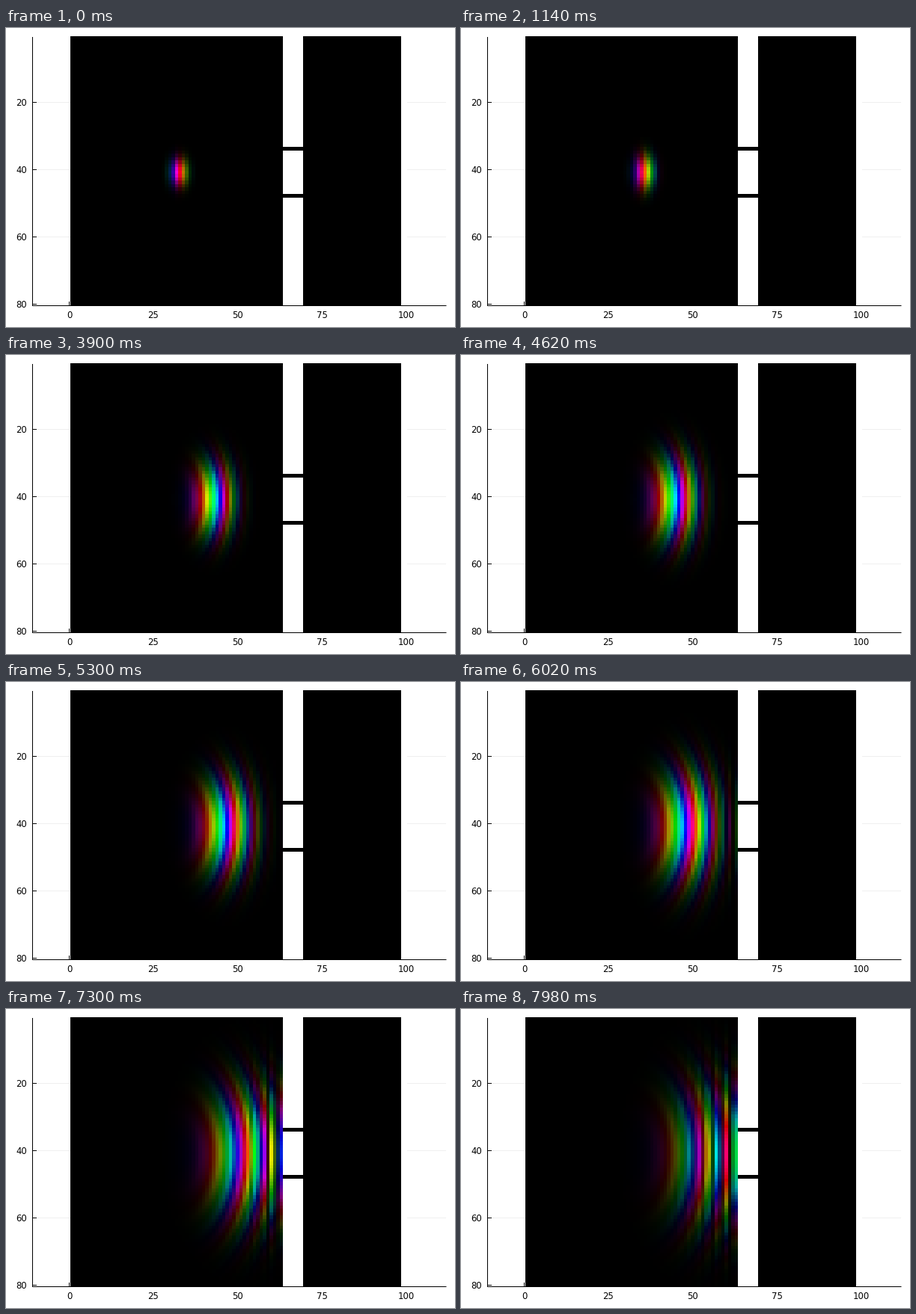
Recreate the animation shown at these times as a matplotlib script. Size 600 by 400 pixels, loop 8 s.

```python
import numpy as np
import matplotlib.pyplot as plt
from matplotlib.animation import FuncAnimation
from matplotlib.colors import hsv_to_rgb

W, H, DPI = 600, 400, 100
TICK_MS, LOOP_MS = 20, 8000
COLS, ROWS = 98, 80
CELL_W, CELL_H = 4.5, 4.49
LEFT, TOP = 86.2, 11.85

# Gaussian wave packet, in grid cells and time steps
X0, Y0 = 32.67, 41.0
SX, SY = 1.687, 2.72
K, V = 0.80, 0.125
SPREAD = 0.0274
PHASE = np.radians(336)
WALL = (64, 69)
SLITS = (34, 48)

gx = np.arange(1, COLS + 1)
gy = np.arange(1, ROWS + 1)[:, None]

wall = np.zeros((ROWS, COLS), bool)
wall[:, WALL[0] - 1:WALL[1]] = True
for row in SLITS:
    wall[row - 1] = False


def packet_x(x, n):
    s = 1 + 1j * SPREAD * n
    moved = x - X0 - V * n
    carrier = K * (x - X0) - K * V * n / 2
    return np.exp(-moved**2 / (4 * SX**2 * s) + 1j * carrier) / np.sqrt(s)


def packet_y(y, n):
    s = 1 + 1j * SPREAD * n
    return np.exp(-(y - Y0)**2 / (4 * SY**2 * s)) / np.sqrt(s)


def field(n):
    # the mirrored packet makes the wall reflect
    px = packet_x(gx, n) - packet_x(2 * WALL[0] - gx, n)
    px = np.where(gx < WALL[0], px, 0)
    return np.exp(1j * PHASE) * px * packet_y(gy, n)


def picture(n):
    psi = field(n)
    density = np.abs(psi)**2
    hue = np.angle(psi) / (2 * np.pi) % 1
    hsv = np.dstack([hue, np.ones_like(hue), density / density.max()])
    rgb = hsv_to_rgb(hsv)
    rgb[wall] = 1
    return rgb


def step_at(ms):
    # three steps per 140 ms, held 20, 100 and 20 ms
    cycle, rest = divmod(ms, 140)
    return 3 * cycle + (rest >= 20) + (rest >= 120)


fig = plt.figure(figsize=(W / DPI, H / DPI), dpi=DPI, facecolor="white")
ax = fig.add_axes([0, 0, 1, 1])
ax.axis("off")


def line(xs, ys, color="black", z=3):
    ax.plot(xs, ys, color=color, lw=72 / DPI, zorder=z, snap=False,
            solid_capstyle="butt")


def label(x, y, text, ha):
    ax.text(x, y, text, ha=ha, va="baseline", family="DejaVu Sans",
            fontsize=8.4, color="black")


image = ax.imshow(picture(0), interpolation="nearest", aspect="auto", zorder=2,
                  extent=(LEFT, LEFT + COLS * CELL_W, TOP + ROWS * CELL_H, TOP))
ax.set_xlim(0, W)
ax.set_ylim(H, 0)

for value in (20, 40, 60, 80):
    y = 9.5 + 4.5 * value
    line((36, 41), (y, y))
    label(28, y + 4.5, str(value), "right")
    if value < 80:
        line((42, 86), (y, y), "#efefef", 1)
        line((536, 588), (y, y), "#efefef", 1)

for value in (0, 25, 50, 75, 100):
    label(84.5 + 4.5 * value, 388, str(value), "center")

line((84.5, 84.5), (366, 371))
line((35.5, 35.5), (12, 372))
line((35, 588.5), (371.5, 371.5))


def update(i):
    image.set_data(picture(step_at(i * TICK_MS)))
    return [image]


anim = FuncAnimation(fig, update, frames=LOOP_MS // TICK_MS,
                     interval=TICK_MS, repeat=True, repeat_delay=0)
plt.show()
```
